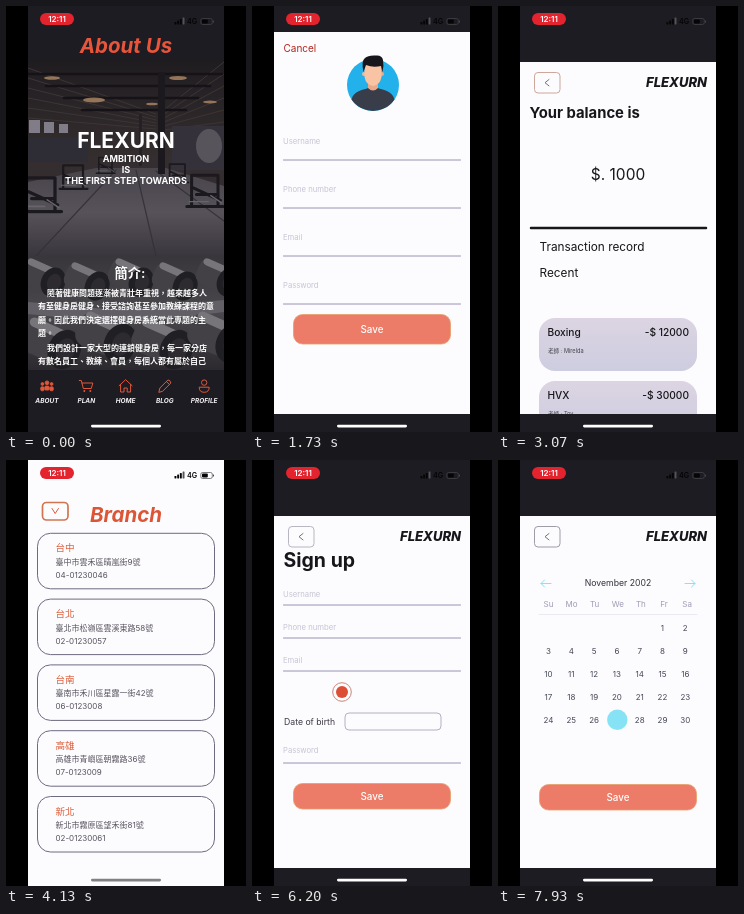
These frames come from a looping animation (240 px wide and 426 px high, 8000 ms). An HTML page:

```html
<!DOCTYPE html>
<html lang="zh-Hant">
<head>
<meta charset="utf-8">
<title>Gym app walkthrough</title>
<style>
  html, body { margin: 0; width: 100%; height: 100%; overflow: hidden; background: #000; }
  svg { display: block; width: 100vw; height: 100vh; }
  text { font-family: Inter, "Noto Sans CJK TC", "Noto Sans CJK", sans-serif; white-space: pre; }
  .line { fill: none; stroke-linecap: round; stroke-linejoin: round; }
</style>
</head>
<body>
<svg id="stage" viewBox="0 0 240 426"></svg>
<script>
const LOOP = 8000, LEFT = 22, WIDTH = 196, HEIGHT = 426;
const DARK = '#1d1c22', PAPER = '#fcfbfd', ORANGE = '#e0583a', INK = '#17161a';
const BRAND = 'FLEXURN';

// ---- drawing helpers: y of a text is the middle of its capitals ----
const text = (x, y, str, size, fill = INK, weight = 400, anchor = 'start', extra = '') =>
  `<text x="${x}" y="${y + size * .36}" font-size="${size}" fill="${fill}" font-weight="${weight}" text-anchor="${anchor}" ${extra}>${str}</text>`;
const center = (x, y, str, size, fill, weight, extra) => text(x, y, str, size, fill, weight, 'middle', extra);
const rect = (x, y, w, h, fill, r = 0, extra = '') =>
  `<rect x="${x}" y="${y}" width="${w}" height="${h}" rx="${r}" fill="${fill}" ${extra}/>`;
const circle = (x, y, r, fill, extra = '') => `<circle cx="${x}" cy="${y}" r="${r}" fill="${fill}" ${extra}/>`;
const path = (d, stroke, width = 1) => `<path class="line" d="${d}" stroke="${stroke}" stroke-width="${width}"/>`;
const shape = (d, fill) => `<path d="${d}" fill="${fill}"/>`;
const at = (x, y, content) => `<g transform="translate(${x} ${y})">${content}</g>`;
const range = (n, fn) => Array.from({ length: n }, (_, i) => fn(i)).join('');
const italic = 'font-style="italic"';

const page = (top, bottom) =>
  rect(LEFT, 0, WIDTH, HEIGHT, DARK) + rect(LEFT, top, WIDTH, bottom - top, PAPER);
const saveButton = (y, h) =>
  rect(41.5, y, 157, h, '#ec7b67', 9, 'stroke="#e6a06c" stroke-width=".8"') + center(120, y + h / 2, 'Save', 9.8, '#fff', 500);
const field = (label, y, lineY) =>
  text(31, y, label, 7.7, '#c8c5d6') + path(`M31.5 ${lineY}H208.5`, '#9a92b4', 1);
const brandHeader = border =>
  rect(36.5, 66.5, 25.5, 20.5, PAPER, 3.5, `stroke="${border}" stroke-width="1"`) +
  path('M51 73.5l-4 3.2 4 3.2', '#66626e', .9) +
  text(209, 76.5, BRAND, 13, INK, 800, 'end', italic);

const avatar = (x, y) => at(x, y,
  circle(0, 0, 26, '#22b1ea') +
  shape('M-21.5 14.5C-19 5-9 5-5 3H5C9 5 19 5 21.5 14.5A26 26 0 0 1-21.5 14.5Z', '#393d49') +
  shape('M-5-5H5V3Q0 8-5 3Z', '#e9a98a') +
  circle(-9, -11, 2, '#f4b898') + circle(9, -11, 2, '#e9a98a') +
  shape('M-8.5-22H8.5V-8Q7 0 0 1Q-7 0-8.5-8Z', '#f8c4a4') +
  shape('M-9.5-13Q-12-24-8-27Q-5-30 3-29.5Q9-30 10-25Q11-20 9.5-13L8-19Q0-17-7-20Z', '#17161d'));

// ---- tab bar ----
const people = on => {
  const style = `stroke="${ORANGE}" stroke-width=".8"`, fill = on ? ORANGE : 'none';
  return [[-4.6, -2, 1.4], [4.6, -2, 1.4], [0, -3.2, 1.9]].map(([x, y, r]) =>
    circle(x, y, r, fill, style) + rect(x - r - .3, y + r + 1.4, r * 2 + .6, 4, fill, 1.2, style)).join('');
};
const person = on => {
  const style = `stroke="${ORANGE}" stroke-width="1"`, fill = on ? ORANGE : 'none';
  return circle(0, -3.4, 2.7, fill, style) + `<path d="M-5 1.2H5Q5 6.3 0 6.3T-5 1.2Z" fill="${fill}" ${style}/>`;
};
const cart = () => path('M-7-5.5H-5L-3 2.5H5L6.5-3H-4.3', ORANGE) + circle(-2, 5, 1, ORANGE) + circle(4, 5, 1, ORANGE);
const house = () => path('M-6.5-.3L0-6.3 6.5-.3M-5-1.5V6H-1.6V2H1.6V6H5V-1.5', ORANGE);
const pencil = () => path('M-6 6L-5 2 3-6Q5-6.5 6-3L-2 5ZM1.5-4.5L4.5-1.5', ORANGE);

const tabBar = active => rect(LEFT, 364, WIDTH, 62, DARK) +
  [['ABOUT', people], ['PLAN', cart], ['HOME', house], ['BLOG', pencil], ['PROFILE', person]].map(([name, icon], i) => {
    const x = 41 + i * 39.3;
    return at(x, 380, icon(name === active)) + center(x, 394.5, name, 6.5, '#f4f2f4', 700, italic);
  }).join('');

// ---- screens ----
function gymPhoto() {
  const lamp = (x, y, w) => `<ellipse cx="${x}" cy="${y}" rx="${w}" ry="${w * .22}" fill="#b08a66" opacity=".8"/>`;
  const machine = (x, y, s) => at(x, y, `<g transform="scale(${s})">` +
    path('M-12 12V-14H10V12M-16 12H15M-12-4L12 7M-8 2H9', '#1b191e', 2.5) +
    path('M-14 8H2M4 3L13 9', '#67646c', 1.2) + '</g>');
  return rect(LEFT, 53, WIDTH, 197, 'url(#gym)') +
    shape('M22 176L90 162H160L218 180V250H22Z', 'url(#floor)') +
    path('M110 164L30 250M130 164L150 250M150 165L218 215', '#35323a', 1.2) +
    range(6, i => path(`M22 ${62 + i * 10}L150 ${108 + i * 3}M218 ${56 + i * 12}L158 ${104 + i * 4}`, '#3d3534', 1)) +
    range(4, i => path(`M${22 + i * 18} ${68 + i * 12}H${216 - i * 12}`, '#151317', 2.6)) +
    range(3, i => rect(23 + i * 15, 114 + i * 2, 11 - i, 13 - i * 2, '#807d88')) +
    rect(22, 132, 60, 24, '#2e2c35') + rect(166, 120, 52, 44, '#34313a') +
    rect(152, 66, 7, 102, '#1b191d') + rect(133, 108, 3, 52, '#232126') +
    `<ellipse cx="203" cy="140" rx="13" ry="17" fill="#58545c"/>` +
    lamp(46, 72, 8) + lamp(88, 94, 11) + lamp(172, 72, 9) + lamp(146, 98, 6) + lamp(204, 96, 7) +
    machine(36, 190, 1.3) + machine(68, 172, .9) + machine(200, 186, 1.2) + machine(172, 168, .7) + machine(100, 160, .6);
}

function dumbbellPhoto() {
  const dumbbell = (x, y, s) => at(x, y, `<g transform="rotate(24) scale(${s})">` +
    rect(-24, -13, 34, 26, '#434146', 9) + rect(-22, -13, 30, 7, '#77747a', 4) +
    `<ellipse cx="10" rx="12" ry="15" fill="#201f23"/><ellipse cx="11" rx="7" ry="9" fill="#2d2b30"/></g>`);
  return rect(LEFT, 250, WIDTH, 114, 'url(#rack)') +
    shape('M22 296L110 304 218 294V306L120 318 22 308Z', '#626066') +
    range(5, i => dumbbell(38 + i * 44, 272 + i % 2 * 4, 1)) +
    range(4, i => dumbbell(46 + i * 56, 338 - i % 2 * 6, 1.35));
}

const aboutLines = [
  [41, 287.5, '隨著健康問題逐漸被青壯年重視，越來越多人'],
  [32, 300.5, '有至健身房健身、接受諮詢甚至參加教練課程的意'],
  [32, 313.7, '願。因此我們決定選擇健身房系統當此專題的主'],
  [32, 327, '題。'],
  [41, 342.3, '我們設計一家大型的連鎖健身房，每一家分店'],
  [32, 355.5, '有數名員工、教練、會員，每個人都有屬於自己'],
];
const about = () => rect(LEFT, 0, WIDTH, HEIGHT, DARK) + gymPhoto() + dumbbellPhoto() +
  center(120, 40, 'About Us', 20.5, '#e9553b', 700, italic) +
  center(120, 134, BRAND, 21, '#fff', 700) +
  center(120, 152.5, 'AMBITION', 9.1, '#fff', 700) +
  center(120, 163.5, 'IS', 9.1, '#fff', 700) +
  center(120, 175, 'THE FIRST STEP TOWARDS', 9.2, '#fff', 700) +
  center(124, 267.5, '簡介:', 13.2, '#fff', 700) +
  aboutLines.map(([x, y, s]) => text(x, y, s, 8, '#fff', 700)).join('') +
  tabBar('ABOUT');

function profile() {
  // four outline points per tooth, eight teeth
  const teeth = Array.from({ length: 32 }, (_, i) => {
    const r = i % 4 < 2 ? 9 : 6.8, a = (i - .5) * Math.PI / 16;
    return `${(r * Math.sin(a)).toFixed(2)} ${(-r * Math.cos(a)).toFixed(2)}`;
  });
  const gear = path(`M${teeth.join('L')}Z`, INK, 1.6) + circle(0, 0, 2.8, 'none', `stroke="${INK}" stroke-width="1.6"`);
  const cards = path('M-3-8H8V3H-3ZM-5-3H-8V8H3V5M-5 5H-2', INK, 1.8) + rect(0, -5, 5, 2.4, INK);
  const contact = path('M-9.5-7H9.5V7H-9.5ZM-5-7V-9.5M5-7V-9.5M-10 9.5H10M-6.5 4.5Q-3.5 0-.5 4.5M3-2H6.5M3 2H6.5', INK, 1.4) + circle(-3.5, -2, 2, INK);
  const exit = path('M3-4V-8H-7V8H3V4M-2 0H8M5-3L8 0 5 3', '#2b2060', 1.7);
  const row = (icon, y, label, x = 60, color = INK) => at(40.5, y, icon) + text(x, y, label, 7.75, color, 700);
  return page(53, 364) + rect(LEFT, 53, WIDTH, 102, '#f3ebf5') +
    circle(120.5, 92, 28.5, '#fff') + avatar(120.5, 92) +
    center(120, 128, 'Name : Jun', 8, INK, 700) + center(120, 141.5, 'LEVEL : 3', 8, INK, 700) +
    row(gear, 170, 'Setting') + row(cards, 198, 'Transaction Record / Balance') + row(contact, 225.5, 'Contact Us', 61.5) +
    `<g id="logout">${row(exit, 253.5, 'Log Out', 61.5, '#2b2060')}</g>` + tabBar('PROFILE');
}

const edit = () => page(26, 408) + text(31.5, 42.5, 'Cancel', 10, '#b3261e') + avatar(121, 79) +
  ['Username', 'Phone number', 'Email', 'Password'].map((label, i) => field(label, 135 + i * 48, 154 + i * 48)).join('') +
  saveButton(308.5, 29.5);

function balance() {
  const record = (y, name, amount, coach) => rect(41, y, 158, 53, 'url(#card)', 16) +
    text(49.5, y + 14.5, name, 10.2, INK, 500) + text(191, y + 14.5, amount, 10.2, INK, 500, 'end') +
    text(50, y + 32.5, `老師 : ${coach}`, 5.6, '#45424d');
  return page(56, 408) + brandHeader('#cda79c') +
    text(31.5, 106.5, 'Your balance is', 14.8, INK, 700) + center(120, 168.5, '$. 1000', 15.5) +
    path('M33 222H208', INK, 2.5) +
    text(41.5, 241, 'Transaction record', 11.8) + text(41.5, 267, 'Recent', 11.8) +
    record(312, 'Boxing', '-$ 12000', 'Mirelda') + record(375, 'HVX', '-$ 30000', 'Tov') +
    rect(LEFT, 408, WIDTH, 18, DARK);
}

const branches = [
  ['台中', '臺中市雲禾區晴嵐街9號', '04-01230046'],
  ['台北', '臺北市松嶺區雲溪東路58號', '02-01230057'],
  ['台南', '臺南市禾川區星露一街42號', '06-0123008'],
  ['高雄', '高雄市青嶼區朝霧路36號', '07-0123009'],
  ['新北', '新北市霧原區望禾街81號', '02-01230061'],
];
const branch = () => rect(LEFT, 0, WIDTH, HEIGHT, PAPER) +
  rect(36.5, 42.5, 25.5, 17.5, PAPER, 4, 'stroke="#cf7650" stroke-width="1.7"') +
  path('M46 48.5l3.2 5 3.2-5', ORANGE, 1) +
  center(120, 55, 'Branch', 20.5, '#dc5636', 700, italic) +
  branches.map(([city, address, phone], i) => at(0, i * 65.8,
    rect(31.5, 73.3, 177, 55.5, PAPER, 13, 'stroke="#706a80" stroke-width="1"') +
    text(49.5, 88, city, 9.6, '#dc5f3c', 500) + text(49.5, 102, address, 8, '#57535e') +
    text(49.5, 115, phone, 8, '#57535e'))).join('');

const signup = () => page(56, 408) + brandHeader('#b9b5c2') + text(31.5, 100, 'Sign up', 19.5, INK, 700) +
  field('Username', 134, 145) + field('Phone number', 167, 178) + field('Email', 200, 211) +
  circle(90, 232, 9.3, PAPER, 'stroke="#c98878" stroke-width="1"') + circle(90, 232, 6, '#dd4f35') +
  text(32, 261.5, 'Date of birth', 8.7, '#3c3943') +
  rect(93, 253, 96, 17, PAPER, 4, 'stroke="#b5b0c4" stroke-width="1"') +
  field('Password', 290, 303) + saveButton(323.5, 25.5);

function calendar() {
  const day = i => {
    const cell = i + 5;
    return center(50.5 + cell % 7 * 22.8, 168.5 + Math.floor(cell / 7) * 22.8, i + 1, 8, '#454857');
  };
  const accent = 'style="stroke:var(--accent)"';
  return page(56, 408) + brandHeader('#9f9ba8') + center(120, 123, 'November 2002', 8.7, '#34323b') +
    `<path class="line" ${accent} d="M53 123.5H43M46.5 120L43 123.5 46.5 127M187 123.5H197M193.5 120L197 123.5 193.5 127"/>` +
    ['Su', 'Mo', 'Tu', 'We', 'Th', 'Fr', 'Sa'].map((d, i) => center(50.5 + i * 23.1, 144, d, 8, '#a09bb6')).join('') +
    path('M41 154.5H199', '#e6e3ec', .7) + range(30, day) +
    '<circle id="picked" cy="259.7" r="10.2" style="fill:var(--accent)"/>' + saveButton(324.5, 25.5);
}

const statusBar = rect(34, 7, 34, 12, '#e3232e', 6) + center(51, 13, '12:11', 8, '#fff', 600) +
  range(4, i => rect(168.5 + i * 2.7, 16 - i * 1.5, 1.9, 2.5 + i * 1.5, i < 3 ? '#050506' : '#55535a', .4)) +
  text(181, 15.5, '4G', 7.2, '#050506', 600) +
  rect(194.8, 12.5, 11.5, 6, 'none', 1.8, 'stroke="#48464d" stroke-width=".7"') +
  rect(196, 13.6, 5.8, 3.8, '#050506', .8) + rect(207, 14.4, 1, 2.2, '#48464d', .4);

const gradient = (id, ...stops) => `<linearGradient id="${id}" x2="0" y2="1">` +
  stops.map((c, i) => `<stop offset="${i / (stops.length - 1)}" stop-color="${c}"/>`).join('') + '</linearGradient>';

const screens = { about, profile, edit, balance, branch, signup, calendar };
const stage = document.getElementById('stage');
stage.innerHTML = `<defs>${gradient('gym', '#1f1c20', '#352e2f', '#2c2930')}${gradient('floor', '#48444a', '#57525a', '#3a363d')}
  ${gradient('rack', '#38363b', '#4a484d', '#2c2a2f')}${gradient('card', '#dcd4e2', '#cdcde0')}
  <clipPath id="phone"><rect x="${LEFT}" width="${WIDTH}" height="${HEIGHT}"/></clipPath></defs>
  <rect width="240" height="426"/><g clip-path="url(#phone)">` +
  Object.entries(screens).map(([id, draw]) =>
    `<g id="${id}">${draw()}${rect(LEFT, 56, WIDTH, 352, '#4a3a90', 0, 'class="shade" opacity="0"')}</g>`).join('') +
  statusBar + rect(85, 418.8, 70, 2.6, '#fff', 1.3, 'id="home"') + '</g>';

// ---- motion ----
const el = id => document.getElementById(id);
const progress = (t, start, duration = 350) => 1 - (1 - Math.min(1, Math.max(0, (t - start) / duration))) ** 3;
const shown = (t, open, close = Infinity) => progress(t, open) - progress(t, close);

function place(id, x, y, visible, shade = 0) {
  const node = el(id);
  node.setAttribute('transform', `translate(${x} ${y})`);
  node.setAttribute('visibility', visible ? 'visible' : 'hidden');
  node.querySelector('.shade').setAttribute('opacity', shade);
}
const push = (id, p, under = 0) => place(id, (1 - p) * WIDTH - under * .3 * WIDTH, 0, p > 0, under * .09);
const modal = (id, p) => place(id, 0, (1 - p) * HEIGHT, p > 0);

function render(t) {
  const balanceIn = shown(t, 2450, 3350);
  const signupIn = shown(t, 5550);
  const calendarIn = shown(t, 6958);
  place('about', 0, 0, t < 600);
  push('profile', t < 600 ? 0 : 1, Math.max(balanceIn, signupIn));
  modal('edit', shown(t, 1100, 2000));
  push('balance', balanceIn);
  modal('branch', shown(t, 3700, 4500));
  push('signup', signupIn, calendarIn);
  push('calendar', calendarIn);

  const picked = t >= 7600;
  stage.style.setProperty('--accent', picked ? '#86e3f5' : '#a3a1aa');
  el('picked').setAttribute('cx', picked ? 119.3 : 73.6);
  el('logout').setAttribute('opacity', t >= 5200 ? .22 : 1);
  el('home').setAttribute('fill', t >= 3850 && t < 5550 ? '#828085' : '#fff');
}

const origin = performance.now();
function tick() {
  render((performance.now() - origin) % LOOP);
  requestAnimationFrame(tick);
}
tick();
</script>
</body>
</html>
```
